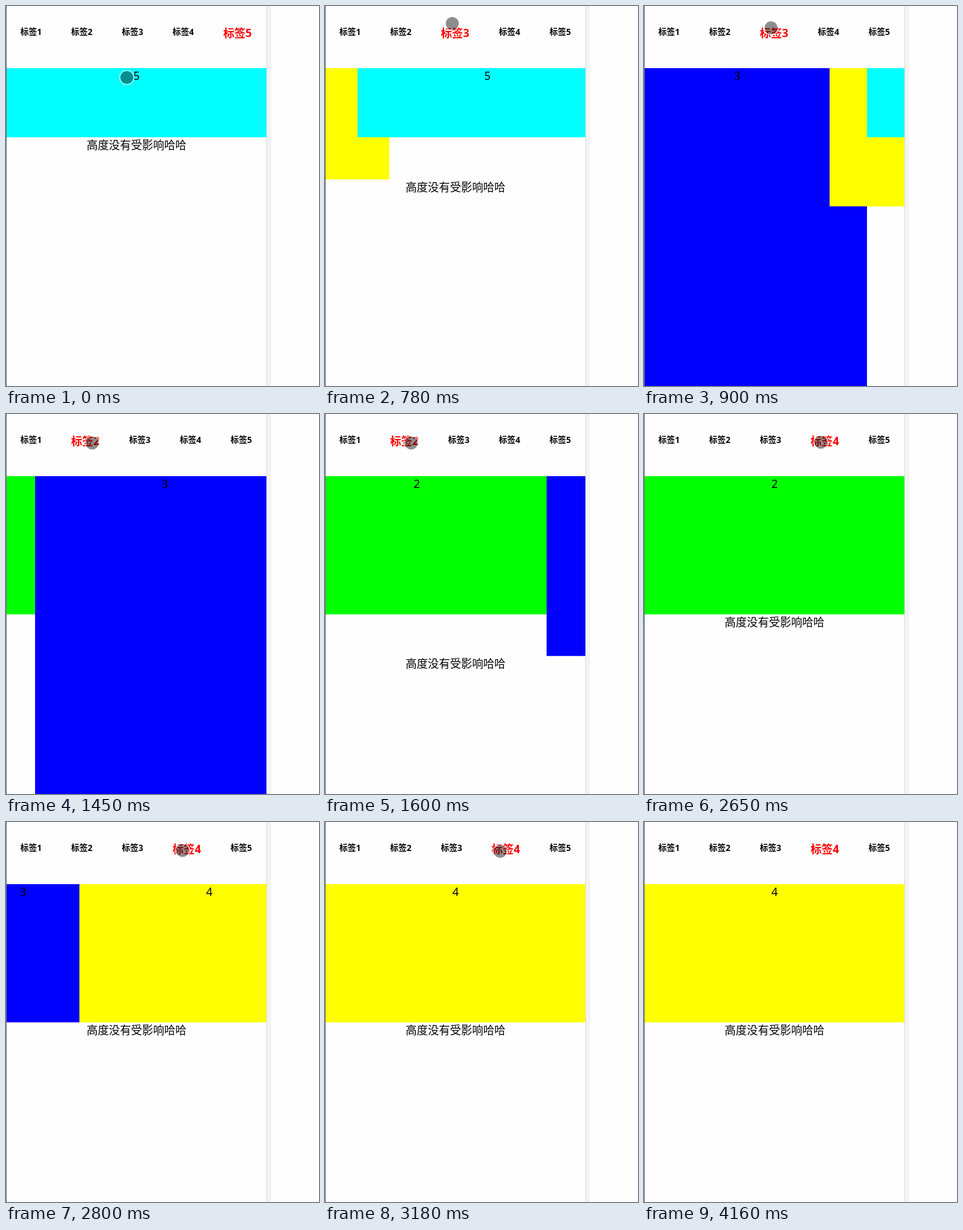
These frames come from a looping animation (452x550 px, 4.41 s). An HTML page with a canvas:

```html
<!DOCTYPE html>
<html lang="zh-CN">
<head>
<meta charset="utf-8">
<title>标签切换</title>
<style>
  html, body { margin: 0; width: 100%; height: 100%; overflow: hidden; background: #fefefe; }
  canvas { display: block; }
</style>
</head>
<body>
<canvas id="stage" width="452" height="550"></canvas>
<script>
const ctx = document.getElementById('stage').getContext('2d');
const LOOP = 4410;
const TICK = 133;         // the picture refreshes once per tick
const TICK_LEAD = 35;     // refreshes run slightly ahead of the tick
const LAST_TICK = 31;
const DURATION = 300;     // slide transition
const LAG = 20;           // from click to slide start
const PAGE = { left: 1, top: 90, width: 375 };
const FONT = '"Noto Sans", "Noto Sans CJK SC", "Noto Sans CJK", sans-serif';
const SLIDES = [
  { color: '#f00', height: 100 },
  { color: '#0f0', height: 200 },
  { color: '#00f', height: 600 },
  { color: '#ff0', height: 200 },
  { color: '#0ff', height: 100 },
];
const CLICKS = [
  { at: -LOOP, tab: 4 },
  { at: 743, tab: 2 },
  { at: 1410.3, tab: 1 },
  { at: 2645, tab: 3 },
];
// Pointer path: tick, x, y.
const POINTER = [
  [0, 174.5, 103.5], [5, 184, 19], [7, 183.5, 31.5], [9, 124.5, 42], [12, 124.5, 42],
  [15, 311.5, 37.5], [19, 256, 40.5], [24, 253, 42.5], [25, 209, 49],
  [26, 354, 196], [29, 434, 479], [LAST_TICK, 431, 570],
];
const ARROW = new Path2D('M.5 .5V16.5L4.2 13L6.7 18.5L9 17.5L6.6 12H11.5Z');

const lerp = (a, b, p) => a + (b - a) * p;

// CSS "ease": cubic-bezier(.25, .1, .25, 1)
function ease(x) {
  if (x <= 0) return 0;
  if (x >= 1) return 1;
  const bezier = (a, b, u) => 3 * a * u * (1 - u) ** 2 + 3 * b * u * u * (1 - u) + u ** 3;
  let low = 0, high = 1;
  for (let i = 0; i < 20; i++) {
    const mid = (low + high) / 2;
    if (bezier(.25, .25, mid) < x) low = mid; else high = mid;
  }
  return bezier(.1, 1, low);
}

function pointerAt(tick) {
  const next = Math.max(1, POINTER.findIndex(([t]) => t >= tick));
  const [t0, x0, y0] = POINTER[next - 1];
  const [t1, x1, y1] = POINTER[next];
  const p = (tick - t0) / (t1 - t0);
  return [lerp(x0, x1, p), lerp(y0, y1, p)];
}

function rect(color, x, y, w, h) {
  ctx.fillStyle = color;
  ctx.fillRect(x, y, w, h);
}

function text(value, x, y, { size = 16, weight = 400, color = '#000', align = 'center' } = {}) {
  ctx.font = `${weight} ${size}px ${FONT}`;
  ctx.textAlign = align;
  ctx.fillStyle = color;
  ctx.fillText(value, x, y);
}

function drawTabs(active) {
  SLIDES.forEach((_, i) => {
    const x = 20.8 + i * 73.25 + (i > active ? 10.5 : 0);
    const style = i === active ? { size: 16, color: '#f00' } : { size: 12 };
    text(`标签${i + 1}`, x, i === active ? 45 : 42, { ...style, weight: 700, align: 'left' });
  });
}

// Each slide rests one page left of, on, or one page right of the active place.
function drawSlides(from, to, p) {
  const { left, top, width } = PAGE;
  const height = lerp(SLIDES[from].height, SLIDES[to].height, p);
  ctx.save();
  ctx.beginPath();
  ctx.rect(left, top, width, height);
  ctx.clip();
  SLIDES.forEach((slide, i) => {
    const x = left + Math.round(width * lerp(Math.sign(i - from), Math.sign(i - to), p));
    rect(slide.color, x, top, width, slide.height);
    text(i + 1, x + width / 2, top + 17);
  });
  ctx.restore();
  text('高度没有受影响哈哈', left + width / 2, top + height + 17);
}

function drawTouch(x, y) {
  ctx.beginPath();
  ctx.arc(x, y, 9.5, 0, 2 * Math.PI);
  ctx.fillStyle = 'rgba(8,8,8,.46)';
  ctx.fill();
  ctx.beginPath();
  ctx.arc(x, y, 10.3, 0, 2 * Math.PI);
  ctx.strokeStyle = 'rgba(255,255,255,.55)';
  ctx.lineWidth = 1.6;
  ctx.stroke();
}

function drawArrow(x, y) {
  ctx.save();
  ctx.translate(Math.round(x), Math.round(y));
  ctx.fillStyle = '#fff';
  ctx.fill(ARROW);
  ctx.strokeStyle = '#000';
  ctx.lineWidth = 1;
  ctx.stroke(ARROW);
  ctx.restore();
}

function draw(now) {
  const tick = Math.min(LAST_TICK, Math.floor((now % LOOP + TICK_LEAD) / TICK));
  const time = tick * TICK;
  const current = CLICKS.findLastIndex(click => click.at <= time);
  const { at, tab } = CLICKS[current];
  const previous = CLICKS[Math.max(0, current - 1)].tab;

  rect('#fefefe', 0, 0, 452, 550);
  drawTabs(tab);
  drawSlides(previous, tab, ease((time - at - LAG) / DURATION));
  rect('#777', 0, 0, 1, 550);
  rect('#f3f3f3', 376, 0, 7, 550);
  rect('#ddd', 376, 0, 1, 550);

  const [x, y] = pointerAt(tick);
  const drawPointer = x < PAGE.left + PAGE.width ? drawTouch : drawArrow;
  drawPointer(x, y);
}

const origin = performance.now();
function animate() {
  draw(performance.now() - origin);
  requestAnimationFrame(animate);
}
animate();
</script>
</body>
</html>
```
